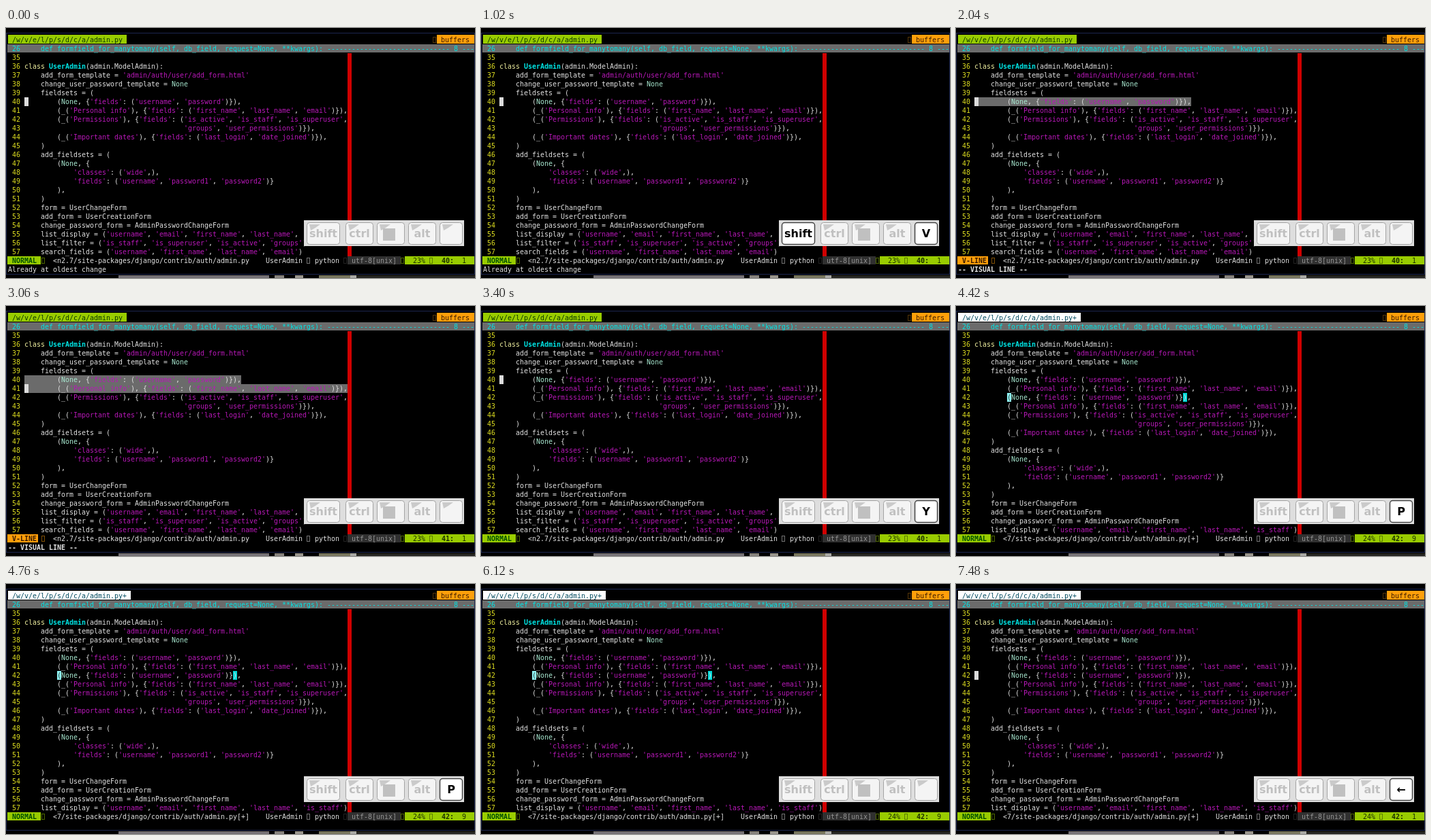
Animation, 688 px wide and 368 px high, one loop 8 s. Source, as an HTML page with a canvas:

```html
<!DOCTYPE html>
<html lang="en">
<head>
<meta charset="utf-8">
<title>Editing admin.py</title>
<style>
html, body { margin: 0; width: 688px; height: 368px; overflow: hidden; background: #000; }
canvas { display: block; }
</style>
</head>
<body>
<canvas id="stage" width="688" height="368"></canvas>
<script>
const ctx = document.getElementById('stage').getContext('2d');
const CW = 6, LH = 13, LEFT = 27, LOOP = 8000;
const GREEN = '#99cc00', ORANGE = '#ff9f0a', CYAN = '#00e5e5', WHITE = '#e2e2e2',
  MAGENTA = '#b818b8', YELLOW = '#dcdc20', GRAY = '#6b6b6b', DARK = '#0a3800';

const code = `
class UserAdmin(admin.ModelAdmin):
    add_form_template = 'admin/auth/user/add_form.html'
    change_user_password_template = None
    fieldsets = (
        (None, {'fields': ('username', 'password')}),
        (_('Personal info'), {'fields': ('first_name', 'last_name', 'email')}),
        (_('Permissions'), {'fields': ('is_active', 'is_staff', 'is_superuser',
                                       'groups', 'user_permissions')}),
        (_('Important dates'), {'fields': ('last_login', 'date_joined')}),
    )
    add_fieldsets = (
        (None, {
            'classes': ('wide',),
            'fields': ('username', 'password1', 'password2')}
        ),
    )
    form = UserChangeForm
    add_form = UserCreationForm
    change_password_form = AdminPasswordChangeForm
    list_display = ('username', 'email', 'first_name', 'last_name', 'is_staff')
    list_filter = ('is_staff', 'is_superuser', 'is_active', 'groups')
    search_fields = ('username', 'first_name', 'last_name', 'email')`.split('\n');
const pasted = [...code.slice(0, 7), ...code.slice(5, 7), ...code.slice(7, -2)];
const wordColors = { UserAdmin: CYAN, class: '#f0f0a0', None: '#a8e8d0' };

// Each step changes part of the editor state.
const steps = [
  [0, { line: 40, col: 0, key: '', shift: false, visual: false, edited: false, msg: 'Already at oldest change' }],
  [680, { shift: true }],
  [1020, { key: 'V' }],
  [1700, { key: '', visual: true, msg: '-- VISUAL LINE --' }],
  [2040, { shift: false }],
  [2380, { line: 41, key: '↓' }],
  [3060, { key: '' }],
  [3400, { line: 40, key: 'Y', visual: false, msg: '' }],
  [4080, { line: 41, key: '↓' }],
  [4420, { line: 42, col: 8, key: 'P', edited: true }],
  [6120, { key: '' }],
  [7140, { col: 7, key: '←' }],
  [7480, { col: 0 }],
];

const rowY = row => 24 + row * LH;

function rect(x, y, w, h, color) {
  ctx.fillStyle = color;
  ctx.fillRect(x, y, w, h);
}

function put(text, x, row, color, bold) {
  ctx.font = `${bold ? 'bold ' : ''}9.967px "DejaVu Sans Mono", monospace`;
  ctx.textAlign = 'left';
  ctx.fillStyle = color;
  [...text].forEach((c, i) => c !== ' ' && ctx.fillText(c, x + i * CW, rowY(row) + 10));
}

// Outline shown for a glyph the font lacks
function tofu(x, row, color) {
  ctx.strokeStyle = color;
  ctx.lineWidth = 1;
  ctx.setLineDash([1, 1]);
  ctx.strokeRect(x + .5, rowY(row) + 2.5, 4, 8);
  ctx.setLineDash([]);
}

function drawLine(text, row) {
  let x = LEFT;
  for (const part of text.split(/('[^']*'|\b(?:UserAdmin|class|None)\b)/)) {
    const color = part[0] === "'" ? MAGENTA : wordColors[part] || WHITE;
    put(part, x, row, color, part === 'UserAdmin');
    x += part.length * CW;
  }
}

function drawTabs(s) {
  const name = ' /w/v/e/l/p/s/d/c/a/admin.py' + (s.edited ? '+ ' : ' ');
  rect(3, 10, name.length * CW, 13, s.edited ? '#fff' : GREEN);
  put(name, 3, -1, s.edited ? '#004a5f' : DARK);
  tofu(626, -1, '#a86a10');
  rect(632, 10, 55, 13, ORANGE);
  put('buffers', 638, -1, '#3a1c00');
}

function drawCode(s) {
  rect(2, rowY(0), 685, 12, GRAY);
  put('26', 9, 0, CYAN);
  put('def formfield_for_manytomany(self, db_field, request=None, **kwargs):', 51, 0, CYAN);
  put('-'.repeat(30) + ' 8 ' + '---', 471, 0, CYAN);
  rect(501, rowY(1), CW, 23 * LH, '#d00000');

  const lines = s.edited ? pasted : code;
  lines.forEach((text, i) => {
    const row = i + 1, line = i + 35;
    if (s.visual && line >= 40 && line <= s.line) rect(LEFT, rowY(row), text.length * CW, LH, GRAY);
    if (line === s.line) {
      const paren = s.col === 8;
      rect(LEFT + s.col * CW, rowY(row), CW, LH, paren ? '#8ff4f4' : '#dcdcdc');
      if (paren) rect(LEFT + 51 * CW, rowY(row), CW, LH, '#00d8d8');
    }
    put(String(line), 9, row, YELLOW);
    drawLine(text, row);
    if (line === s.line && s.col === 8) put('(', LEFT + 48, row, '#104040');
  });
}

function drawStatus(s) {
  const mode = s.visual ? ORANGE : GREEN, y = rowY(24), ink = '#1c3000';
  rect(2, y, s.visual ? 45 : 49, 12, mode);
  put(s.visual ? 'V-LINE' : 'NORMAL', 9, 24, s.visual ? '#3a1c00' : '#005000', true);
  tofu(52, 24, mode);
  const path = s.edited ? '<7/site-packages/django/contrib/auth/admin.py[+]'
    : '<n2.7/site-packages/django/contrib/auth/admin.py';
  put(path, 69, 24, WHITE);
  put('UserAdmin', 381, 24, WHITE);
  tofu(441, 24, WHITE);
  put('python', 453, 24, WHITE);
  tofu(495, 24, '#444');
  rect(501, y, 78, 12, '#303030');
  put('utf-8[unix]', 507, 24, '#969696');
  tofu(579, 24, GREEN);
  rect(585, y, 102, 12, GREEN);
  put(s.edited ? '24%' : '23%', 597, 24, ink);
  tofu(621, 24, ink);
  put(s.line + ':', 639, 24, ink, true);
  put(String(s.col + 1), 669, 24, ink);
  put(s.msg, 3, 25, WHITE, s.visual);
}

// Window frame and the strip of desktop below it
function drawDesktop() {
  ctx.strokeStyle = '#1c2650';
  ctx.lineWidth = 1;
  ctx.strokeRect(.5, 7.5, 687, 355);
  rect(165, 364, 221, 4, '#747074');
  rect(394, 364, 14, 4, '#85817c');
  rect(424, 364, 12, 4, '#98948c');
  rect(459, 364, 46, 4, '#77755c');
  rect(505, 364, 9, 4, '#a8a8a4');
  rect(514, 364, 174, 4, '#24241f');
}

function drawKey(x, w, label, active) {
  ctx.beginPath();
  ctx.roundRect(x + .5, 286.5, w - 1, 32, 4);
  ctx.fillStyle = active ? '#fff' : '#f4f4f4';
  ctx.fill();
  ctx.lineWidth = active ? 1.5 : 1;
  ctx.strokeStyle = active ? '#444' : '#a4a4a4';
  ctx.stroke();
  if (!active) {
    ctx.beginPath();
    ctx.moveTo(x + 4, 289);
    ctx.lineTo(x + 20, 289);
    ctx.lineTo(x + 13, 294);
    ctx.lineTo(x + 6, 298);
    ctx.fillStyle = '#cacaca';
    ctx.fill();
  }
  ctx.font = 'bold 16px "DejaVu Sans", sans-serif';
  ctx.textAlign = 'center';
  ctx.fillStyle = active ? '#000' : '#c0c0c0';
  ctx.fillText(label, x + w / 2, 308);
}

function drawKeys(s) {
  rect(437, 283, 235, 38, '#dedede');
  drawKey(441, 49, 'shift', s.shift);
  drawKey(498, 41, 'ctrl');
  drawKey(544, 41, '');
  rect(553, 295, 18, 18, '#c0c0c0');
  drawKey(590, 41, 'alt');
  drawKey(636, 34, s.key, s.key !== '');
}

function draw(now) {
  const t = now % LOOP;
  const s = Object.assign({}, ...steps.filter(([at]) => at <= t).map(([, change]) => change));
  rect(0, 0, 688, 368, '#000');
  drawDesktop();
  drawTabs(s);
  drawCode(s);
  drawStatus(s);
  drawKeys(s);
  requestAnimationFrame(draw);
}
requestAnimationFrame(draw);
</script>
</body>
</html>
```
